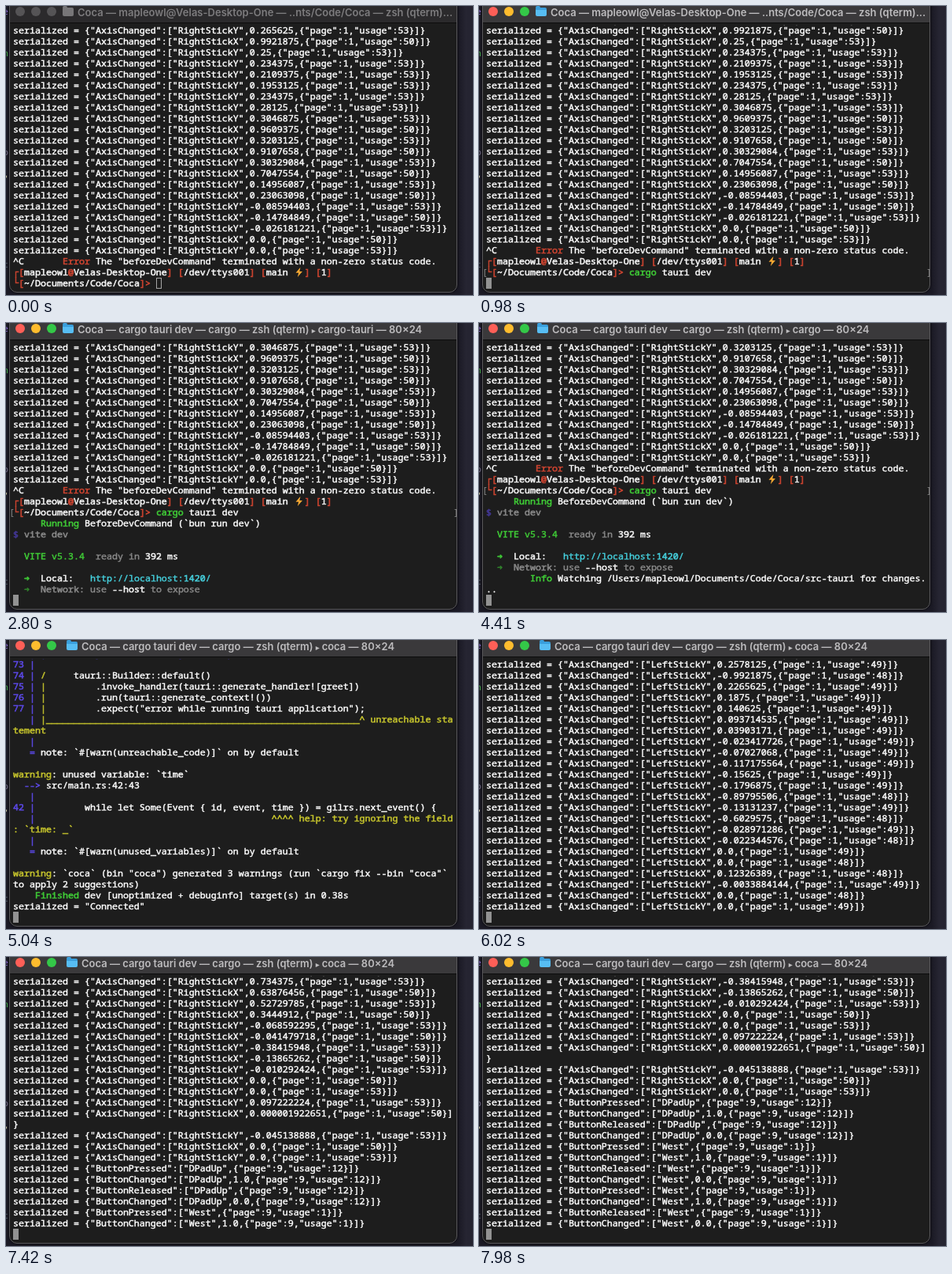
Animation of 594 by 368 pixels, one loop 8 s. Source, as an HTML page:

```html
<!DOCTYPE html>
<html lang="en">
<head>
<meta charset="utf-8">
<title>Terminal session</title>
<style>
html, body { margin: 0; width: 100%; height: 100%; overflow: hidden; background: #1a1924; }
#stage { position: relative; width: 594px; height: 368px; overflow: hidden;
  background: linear-gradient(90deg, #1b1a25 97%, #262532 98.5%, #242330); }
#stage > *, #window > * { position: absolute; }
.scrap { left: -4px; font: 11.667px/14px 'Noto Sans Mono', monospace; }
#window { left: 4px; top: -20px; width: 568px; height: 383px; overflow: hidden; background: #1d1d1d;
  border: 1px solid #5a595c; border-radius: 10px; box-shadow: 0 0 3px #000; }
#bar { left: 0; top: 0; width: 100%; height: 40px; background: #3a393b; border-bottom: 1px solid #0c0c0c; }
.light { top: 1px; width: 12px; height: 12px; border-radius: 50%; }
#folder { top: 2px; width: 14px; height: 11px; border-radius: 2px; color: #57bdf3;
  background: linear-gradient(#3a9fdc 3px, currentColor 3px); }
#folder::before { content: ''; position: absolute; left: 0; top: -2px; width: 6px; height: 4px;
  border-radius: 2px; background: #3a9fdc; }
#title { top: -1px; font: 600 13px/18px Inter, sans-serif; color: #bdbcbe; white-space: pre; }
#title small { font-size: 9px; }
.idle #bar { background: #2b2a2c; }
.idle .light { background: #555456 !important; }
.idle #folder, .idle #folder::before { background: #777678; }
.idle #title { color: #7d7c7e; }
#screen { left: 4px; top: 24px; width: 572px; height: 336px; overflow: hidden; }
#log { position: absolute; left: 5px; width: 563px; color: #fff;
  font: 11.667px/14px 'Noto Sans Mono', monospace; -webkit-text-stroke: .45px;
  white-space: pre-wrap; line-break: anywhere; }
#log div { position: relative; min-height: 14px; }
#log b { font-weight: inherit; -webkit-text-stroke-width: .6px; }
.r { color: #cf4430; } .g { color: #3fcb36; } .y { color: #c3c12c; } .b { color: #5b48e6; }
.c { color: #45cfdc; } .d { color: #898989; } .w { color: #f4f4f4; }
i { display: inline-block; height: 14px; vertical-align: top; font-style: normal; }
.arrow { width: 7px; font-size: 8.5px; }
.bolt { width: 14px; background: #f7a832;
  clip-path: polygon(62% 5%, 20% 56%, 46% 56%, 36% 95%, 80% 42%, 54% 42%); }
.mark { position: absolute; top: 0; color: #8a8a8a; -webkit-text-stroke: 0; }
#cursor { top: 346px; width: 7px; height: 14px; background: #929292; }
.idle #cursor { box-sizing: border-box; background: none; border: 1px solid #a5a5a5; }
</style>
</head>
<body>
<div id="stage">
  <span class="scrap" style="top:0;color:#8a6ad0">e</span>
  <span class="scrap" style="top:53px;color:#46b04a">n</span>
  <span class="scrap" style="top:179px;color:#77718c">o</span>
  <span class="scrap" style="top:213px;color:#c9c6a0">"</span>
  <span class="scrap" style="top:322px;color:#55606a">t</span>
  <div id="window"><div id="bar"></div></div>
  <div class="light" style="left:12px;background:#fe5f57"></div>
  <div class="light" style="left:32px;background:#febc2e"></div>
  <div class="light" style="left:52px;background:#34c848"></div>
  <div id="folder"></div>
  <div id="title"></div>
  <div id="screen"><div id="log"></div></div>
  <div id="cursor"></div>
</div>
<script>
const LOOP = 8000, FOCUS = 70, RECALL = 630, ENTER = 980;
const USER = 'mapleowl', HOST = 'Velas-Desktop-One';
const $ = id => document.getElementById(id);
const [red, green, yellow, blue, cyan, dim, bold] =
  [...'rgybcdw'].map(name => text => `<b class="${name}">${text}</b>`);

const lines = [];
const print = (time, ...rows) => rows.forEach(html => lines.push({ time, html }));

// Stick readings such as "Y0.25", spread evenly over 70 ms updates
function sticks(side, start, updates, readings) {
  const usage = side === 'Left' ? { X: 48, Y: 49 } : { X: 50, Y: 53 };
  readings.trim().split(/\s+/).forEach((reading, i, all) => {
    const axis = reading[0];
    print(start + 70 * Math.floor(i * updates / all.length),
      `serialized = {"AxisChanged":["${side}Stick${axis}",${reading.slice(1)},{"page":1,"usage":${usage[axis]}}]}`);
  });
}

function button(time, name, usage, down) {
  const code = `{"page":9,"usage":${usage}}]}`;
  print(time,
    `serialized = {"Button${down ? 'Pressed' : 'Released'}":["${name}",${code}`,
    `serialized = {"ButtonChanged":["${name}",${down ? '1.0' : '0.0'},${code}`);
}

sticks('Right', 0, 1, `Y0.265625 X0.9921875 Y0.25 Y0.234375 Y0.2109375 Y0.1953125 Y0.234375
  Y0.28125 Y0.3046875 X0.9609375 Y0.3203125 X0.9107658 Y0.30329084 X0.7047554 Y0.14956087
  X0.23063098 Y-0.08594403 X-0.14784849 Y-0.026181221 X0.0 Y0.0`);

const box = text => red('[') + bold(text) + red(']');
print(0,
  `^C       ${red('Error')} The "beforeDevCommand" terminated with a non-zero status code.`,
  red('┌') + [box(USER + red('@') + HOST), box('/dev/ttys001'),
    box('main <i class="bolt"></i>'), box('1')].join(' '),
  red('└') + box('~/Documents/Code/Coca') + red('>') +
    ` <span id="command">${green('cargo')} tauri dev</span>` +
    '<span class="mark" style="left:-5px">[</span><span class="mark" style="left:560px">]</span>');

const arrow = '<i class="arrow">➜</i>';
print(2240,
  `     ${green('Running')} BeforeDevCommand (\`bun run dev\`)`,
  `${blue('<span style="opacity:.6">$</span>')} ${dim('vite dev')}`);
print(2660, '', `  ${green('VITE')} <span class="g">v5.3.4</span>  <span class="d">ready in</span> ${bold('392')} ms`, '');
print(2730,
  `  ${green(arrow)}  ${bold('Local:')}   <span class="c">http://localhost:${cyan('1420')}/</span>`,
  `  <span class="g" style="opacity:.6">${arrow}</span>  ${dim('Network:')} <span class="d">use</span> ${bold('--host')} <span class="d">to expose</span>`);
print(4410, `        ${green('Info')} Watching /Users/${USER}/Documents/Code/Coca/src-tauri for changes...`);

const gutter = (number = '') => blue(number.toString().padEnd(3) + '|');
const warning = text => yellow('warning') + bold(': ' + text);
const place = at => `  ${blue('-->')} src/main.rs:${at}`;
const note = lint => `   ${blue('=')} ${bold('note:')} \`#[warn(${lint})]\` on by default`;
const source = (number, code, edge = '|') => `${gutter(number)} ${yellow(edge)}     ${code}`;

print(4550,
  warning('unused import: `Button`'), place('4:13'), gutter(),
  gutter(4) + ' use gilrs::{Button, Event, Gilrs};',
  gutter() + '             ' + yellow('^^^^^^'), gutter(), note('unused_imports'), '');
print(4620,
  warning('unreachable statement'), place('74:5'), gutter(),
  source(40, 'loop {', '/'), source(72, '}'),
  `${gutter()} ${blue('|_____- any code following this expression is unreachable')}`);
print(4690,
  gutter(73),
  source(74, 'tauri::Builder::default()', '/'),
  source(75, '    .invoke_handler(tauri::generate_handler![greet])'),
  source(76, '    .run(tauri::generate_context!())'),
  source(77, '    .expect("error while running tauri application");'),
  `${gutter()} ${yellow('|' + '_'.repeat(57) + '^ unreachable statement')}`,
  gutter(), note('unreachable_code'), '');
print(4760,
  warning('unused variable: `time`'), place('42:43'), gutter(),
  gutter(42) + '         while let Some(Event { id, event, time }) = gilrs.next_event() {',
  gutter() + ' '.repeat(43) + yellow('^^^^ help: try ignoring the field: `time: _`'),
  gutter(), note('unused_variables'), '');
print(4830,
  yellow('warning') + ': `coca` (bin "coca") generated 3 warnings (run `cargo fix --bin "coca"` to apply 2 suggestions)');
print(4900, `    ${green('Finished')} dev [unoptimized + debuginfo] target(s) in 0.38s`);
print(5040, 'serialized = "Connected"');

sticks('Left', 5810, 4, `X-0.15625 X-0.4453125 Y0.1171875 X-0.78125 Y0.2421875
  Y0.2578125 X-0.9921875 Y0.2265625 Y0.1875 Y0.140625 Y0.093714535 Y0.03903171
  Y-0.023417726 Y-0.07027068 Y-0.117175564 Y-0.15625 Y-0.1796875 X-0.89795506 Y-0.13131237
  X-0.6029575 Y-0.028971286 X-0.022344576 Y0.0 X0.0 X0.12326389 Y-0.0033884144 X0.0 Y0.0`);
sticks('Right', 6370, 3, `X0.1328125 Y0.2265625 X0.3515625 Y0.4921875 X0.5859375 Y0.6796875 X0.671875
  Y0.734375 X0.63876456 Y0.52729785 X0.3444912 Y-0.068592295 X-0.041479718 Y-0.38415948
  X-0.13865262 Y-0.010292424 X0.0 Y0.0 Y0.097222224 X0.000001922651 Y-0.045138888 X0.0 Y0.0`);
button(7000, 'DPadUp', 12, true);
button(7140, 'DPadUp', 12, false);
button(7420, 'West', 1, true);
button(7630, 'West', 1, false);
button(7840, 'West', 1, true);
button(7980, 'West', 1, false);

const running = name => `Coca — cargo tauri dev — cargo — zsh (qterm) <small>▸</small> ${name} — 80×24`;
const titles = [
  { time: 0, left: 91, html: `Coca — ${USER}@${HOST} — ..nts/Code/Coca — zsh (qterm)...` },
  { time: 1050, left: 91, html: running('cargo-tauri') },
  { time: 4410, left: 93, html: running('cargo') },
  { time: 4900, left: 96, html: running('coca') },
];

for (const line of lines) {
  line.element = document.createElement('div');
  line.element.innerHTML = line.html;
  $('log').append(line.element);
}
const marks = document.querySelectorAll('.mark');

function draw(t) {
  for (const { time, element } of lines) element.hidden = t < time;
  const entered = t >= ENTER, recalled = t >= RECALL;
  $('stage').className = t < FOCUS ? 'idle' : '';
  $('log').style.bottom = entered ? '14px' : 0;
  $('command').style.visibility = recalled ? 'visible' : 'hidden';
  marks.forEach(mark => mark.hidden = !entered);
  const column = entered ? 0 : recalled ? 41 : 26;
  $('cursor').style.left = 9 + 7 * column + 'px';
  const { left, html } = titles.filter(title => t >= title.time).pop();
  $('title').innerHTML = html;
  $('title').style.left = left + 'px';
  $('folder').style.left = left - 19 + 'px';
}

const start = performance.now();
function tick() {
  draw((performance.now() - start) % LOOP);
  requestAnimationFrame(tick);
}
tick();
</script>
</body>
</html>
```
